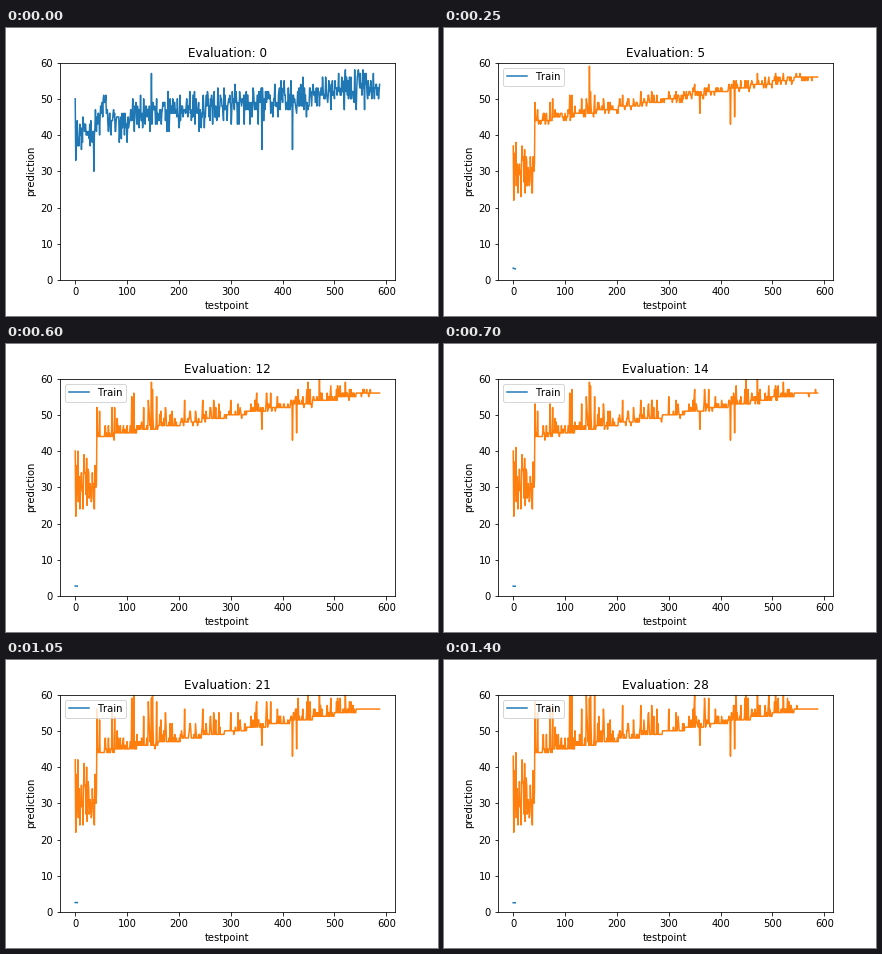
Write a matplotlib script that moves like this. It is 432x288 px and loops after 1.45 s.

```python
import matplotlib.pyplot as plt
import numpy as np
from matplotlib.animation import FuncAnimation

FRAMES, STEP_MS = 29, 50
N, JUMP = 588, 42

plt.rcParams.update({
    "figure.subplot.left": 0.125, "figure.subplot.right": 0.9,
    "figure.subplot.bottom": 0.125, "figure.subplot.top": 0.88,
    "font.family": "DejaVu Sans", "font.size": 10,
    "text.kerning_factor": 6,
})

x = np.arange(N)
rng = np.random.default_rng(12)

# Outliers visible both before and after training
marks = [147, 360, 419, 427]

# Untrained predictions: bounded noise around a slow trend
trend = np.interp(x, [0, 40, 50, 85, 130, 250, N], [40, 42, 47, 43, 46, 47, 53.5])
first = np.round(trend + np.clip(rng.normal(0, 2.6, N), -5.5, 5.5))
first[marks] = 57, 36, 36, 46
first[[0, 1, 36]] = 50, 33, 30

# Trained predictions: unsettled head, then a staircase with upward spikes
head = np.round(rng.triangular(22, 26, 46, JUMP))
head[:2] = 43, 22
stairs = np.minimum(np.floor(44.2 + 0.0236 * (x - JUMP)), 56)
height = np.interp(x, [JUMP, 200, 300, 515, 545], [3.8, 3, 2.7, 2.5, 0])
spikes = height * rng.exponential(1, N) * (rng.random(N) < 0.45)
spikes[JUMP] = 14


def prediction(k):
    if k == 0:
        return first
    noise = np.random.default_rng([5, k])
    growth = (k / (FRAMES - 1)) ** 0.6
    y = stairs + spikes * growth
    y[:JUMP] = np.where(head > 30, 30 + (head - 30) * (0.3 + 0.7 * growth), head)
    y += noise.integers(-1, 2, N) * (noise.random(N) < 0.8 * np.exp(-k / 6))
    y[marks] = 59, 46, 43, 45
    return np.round(y + (first - y) * np.exp(-k / 1.3))


fig, ax = plt.subplots(figsize=(6, 4), dpi=72)
train, = ax.plot([], [], color="C0", label="Train")
pred, = ax.plot(x, first)
legend = ax.legend(handles=[train], loc="upper left")
margin = 0.05 * (N - 1)
ax.set(xlim=(-margin, N - 1 + margin), ylim=(0, 60),
       xlabel="testpoint", ylabel="prediction")
title = ax.set_title("Evaluation: 0")
epochs = np.arange(5)


def update(k):
    title.set_text(f"Evaluation: {k}")
    pred.set_ydata(prediction(k))
    pred.set_color("C1" if k else "C0")
    legend.set_visible(k > 0)
    if k:
        train.set_data(epochs, 2.4 + 4.4 / (k + 0.4 * epochs))
    else:
        train.set_data([], [])
    return train, pred, legend, title


anim = FuncAnimation(fig, update, frames=FRAMES, interval=STEP_MS,
                     repeat=True, repeat_delay=0, blit=False)
plt.show()
```
